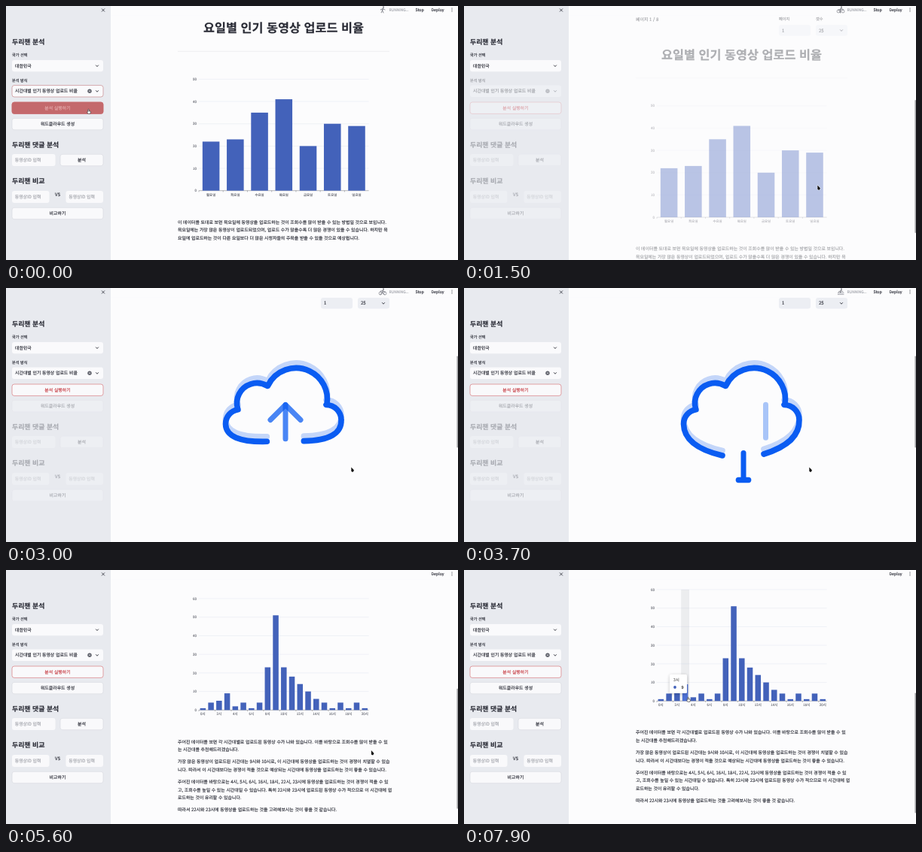
Write an HTML page with a canvas that moves like this. It is 600 px wide and 338 px high and loops after 8000 ms.

```html
<!DOCTYPE html>
<html lang="ko">
<head>
<meta charset="utf-8">
<style>
html, body { margin: 0; width: 100%; height: 100%; overflow: hidden; background: #fcfcfd; }
canvas { display: block; width: 600px; height: 338px; }
</style>
</head>
<body>
<canvas id="stage"></canvas>
<script>
const LOOP = 8000, W = 600, H = 338;
const LOADING = 1700, LOADED = 4400;
const INK = '#292b35', SOFT = '#6e7079', PALE = '#a3a5ac', RULE = '#dcdde3';
const BG = '#fcfcfd', BLUE = '#0a5cf2', BAR = '#4362ba', RED = '#c8434a';
const FONT = '"Noto Sans CJK KR", "Noto Sans CJK", "Noto Sans KR", sans-serif';
const BODY = 5.92, SMALL = 5.2, AXIS = 4.45;
const LEFT = 228, RIGHT = 509, MID = (LEFT + RIGHT) / 2;

const canvas = document.getElementById('stage');
const dpr = window.devicePixelRatio || 1;
canvas.width = W * dpr;
canvas.height = H * dpr;
const c = canvas.getContext('2d');

const ramp = (t, a, b) => Math.max(0, Math.min(1, (t - a) / (b - a)));
const mix = (a, b, k) => a + (b - a) * k;
const glide = (t, a, b) => {
  const k = ramp(t, a, b);
  return k * k * (3 - 2 * k);
};

function faded(alpha, draw) {
  c.save();
  c.globalAlpha *= alpha;
  draw();
  c.restore();
}

// y is the visual middle of the line; a hairline stroke gives the soft, dark look
function text(s, x, y, { size = BODY, color = INK, weight = 400, align = 'left' } = {}) {
  c.save();
  c.translate(x, y + size * 0.37);
  c.scale(0.25, 0.25);
  c.textRendering = 'geometricPrecision';
  c.font = `${weight} ${size * 4}px ${FONT}`;
  c.fillStyle = c.strokeStyle = color;
  c.lineWidth = 0.6;
  c.lineJoin = 'round';
  c.textAlign = align;
  c.fillText(s, 0, 0);
  c.strokeText(s, 0, 0);
  c.restore();
}

function box(x, y, w, h, fill, stroke, r = 3) {
  c.beginPath();
  c.roundRect(x, y, w, h, r);
  if (fill) { c.fillStyle = fill; c.fill(); }
  if (stroke) { c.strokeStyle = stroke; c.lineWidth = 0.6; c.stroke(); }
}

function line(pts, color, width = 0.5) {
  c.beginPath();
  pts.forEach(([x, y]) => c.lineTo(x, y));
  c.strokeStyle = color;
  c.lineWidth = width;
  c.stroke();
}
const hline = (x0, x1, y, color, width) => line([[x0, y], [x1, y]], color, width);
const vline = (x, y0, y1, color, width) => line([[x, y0], [x, y1]], color, width);

function disc(x, y, r, color) {
  c.beginPath();
  c.arc(x, y, r, 0, 7);
  c.fillStyle = color;
  c.fill();
}

const chevron = (x, y) => line([[x - 1.8, y - 1], [x, y + 1], [x + 1.8, y - 1]], INK, 0.9);

function cross(x, y, r, color, w) {
  line([[x - r, y - r], [x + r, y + r]], color, w);
  line([[x + r, y - r], [x - r, y + r]], color, w);
}

// Sidebar: every control is placed by its middle line
const PAD = 8, FULL = 121, ROW = 15.4;

function button(label, x, y, w, color = INK, edge = '#d5d7dd', fill = '#f9f9fb') {
  box(x, y - ROW / 2, w, ROW, fill, edge);
  text(label, x + w / 2, y, { color, align: 'center' });
}

function field(x, y, w) {
  box(x, y - 8, w, 16, '#f9f9fb');
  text('동영상ID 입력', x + 3.7, y, { color: PALE });
}

function select(label, value, y, edge) {
  text(label, PAD, y - 14.6, { size: SMALL });
  box(PAD, y - ROW / 2, FULL, ROW, '#fafafc', edge);
  text(value, PAD + 4, y);
  chevron(121, y);
}

const heading = (s, y) => text(s, PAD, y, { size: 8.9, weight: 700 });

function sidebar(t) {
  c.fillStyle = '#e8eaef';
  c.fillRect(0, 0, 139, H);
  cross(129, 5.5, 2, INK, 0.8);
  heading('두리챈 분석', 47.3);
  select('국가 선택', '대한민국', 79.6);

  const stale = glide(t, 150, 900);
  const y = 113.3, run = y + 22.4;
  faded(1 - 0.65 * (stale - glide(t, 1500, 1750)), () => {
    select('분석 방식', '시간대별 인기 동영상 업로드 비율', y, t < 300 && '#c07a7c');
    disc(111, y, 2.7, '#5f616b');
    cross(111, y, 1, '#fff', 0.6);
    button('분석 실행하기', PAD, run, FULL, RED, '#d4686d');
    faded(1 - ramp(t, 120, 350), () =>
      button('분석 실행하기', PAD, run, FULL, '#e3a9aa', '#c4696c', '#c4696c'));
  });

  faded(1 - 0.7 * (stale - glide(t, 4300, 4480)), () => {
    button('워드클라우드 생성', PAD, run + 21.4, FULL);
    heading('두리챈 댓글 분석', 184.3);
    field(PAD, 205, 57.5);
    button('분석', 72, 205, 57);
    heading('두리챈 비교', 233);
    field(PAD, 254, 49.5);
    text('VS', 68.5, 251, { align: 'center' });
    field(79.5, 254, 49.5);
    button('비교하기', PAD, 276, FULL);
  });
}

const VIDEOS = [
  ['달콩 소리 / dalko sound', '라온아이(LAONI)의 옥상무대를 라이브로! | HEY-YAYA, LIFT UP, WW, KLOK KN'],
  ['한들맑은수', '[한들맑은수] 한들맑은수의 입맞춤의 만남) teaser'],
  ['헬태산 GYM TAE SAAN', '프로회사가 된 그노즈... (Feat. 율해팀장)'],
  ['NOVALANES', '[RIDING NOVALANES SPECIAL] 가타 쿵쿵 : 아니마니 아니마니고 (ETC. : Bumpy Bunk'],
  ['QLTB', '음방 1위까지 한 바두럽 아이돌 플래이션 설계 ㅈㅈ'],
  ['공놀이방', '‘끝내주는 남자’ 손흘민 ‘1골 2도움’ 맹활약! #BALLDAY'],
  ['선장아재 Skipper Uncle', '한국에서 만난 요원 친구들 (feat. 체코괴, 챈치, 마평가레이, 삐니보들)'],
  ['NOVALANES', '[RIDING NOVALANES SPECIAL] 가타 쿵쿵 : 내가 이걸 피느질 보고 싶어 (ETC. : I Want To S']
];

// T is the height of the chart title on the stage
function table(T) {
  const top = T - 200, bottom = T - 61;
  c.save();
  c.beginPath();
  c.rect(LEFT, top, RIGHT - LEFT, bottom - top);
  c.clip();
  VIDEOS.forEach(([name, title], i) => {
    const y = T - 172 + i * 14;
    text(i + 2, 245, y, { size: 4.85, color: SOFT, align: 'right' });
    text(name, 252, y, { size: 4.85 });
    text(title, 316, y, { size: 4.85 });
    hline(LEFT, RIGHT, y + 7, RULE);
  });
  [LEFT, 248.5, 313, RIGHT].forEach(x => vline(x, top, bottom, RULE));
  c.restore();
}

function pager(T) {
  const y = T - 32;
  [[418, 1], [467, 25]].forEach(([x, value]) => {
    box(x, y - 7.3, 42, 14.6, '#eceef3');
    text(value, x + 4, y);
  });
  chevron(501, y);
}

// One sharp peak at nine, a straight decline after it, a low ripple elsewhere
function uploads(hour) {
  if (hour === 9) return 51;
  if (hour === 8) return 23;
  if (hour > 9 && hour < 15) return Math.floor(23 - 4.25 * (hour - 10));
  return Math.round(1.4 + 2.4 * (hour % 2) + 5.6 * Math.exp(-((hour - 2.6) ** 2)));
}

const DAYS = {
  title: '요일별 인기 동영상 업로드 비율',
  values: [22, 23, 35, 41, 20, 30, 29],
  label: i => '월화수목금토일'[i] + '요일',
  every: 1, max: 50,
  paras: [[
    '이 데이터를 토대로 보면 목요일에 동영상을 업로드하는 것이 조회수를 많이 받을 수 있는 방법일 것으로 보입니다.',
    '목요일에는 가장 많은 동영상이 업로드되었으며, 업로드 수가 많을수록 더 많은 경쟁이 있을 수 있습니다. 하지만 목',
    '요일에 업로드하는 것이 다른 요일보다 더 많은 시청자들의 주목을 받을 수 있을 것으로 예상됩니다.'
  ]]
};
const HOURS = {
  title: '시간대별 인기 동영상 업로드 비율',
  values: Array.from({ length: 21 }, (_, i) => uploads(i)),
  label: i => i + '시',
  every: 2, max: 60,
  paras: [[
    '주어진 데이터를 보면 각 시간대별로 업로드된 동영상 수가 나와 있습니다. 이를 바탕으로 조회수를 많이 받을 수 있',
    '는 시간대를 추천해드리겠습니다.'
  ], [
    '가장 많은 동영상이 업로드된 시간대는 9시와 10시로, 이 시간대에 동영상을 업로드하는 것이 경쟁이 치열할 수 있습',
    '니다. 따라서 이 시간대보다는 경쟁이 적을 것으로 예상되는 시간대에 동영상을 업로드하는 것이 좋을 수 있습니다.'
  ], [
    '주어진 데이터를 바탕으로는 4시, 5시, 6시, 16시, 18시, 22시, 23시에 동영상을 업로드하는 것이 경쟁이 적을 수 있',
    '고, 조회수를 높일 수 있는 시간대일 수 있습니다. 특히 22시와 23시에 업로드된 동영상 수가 적으므로 이 시간대에 업',
    '로드하는 것이 유리할 수 있습니다.'
  ], [
    '따라서 22시와 23시에 동영상을 업로드하는 것을 고려해보시는 것이 좋을 것 같습니다.'
  ]]
};

const X0 = 256, X1 = 481.6, PLOT = 148.3, BASE = 216.7;

function report(data, T, grow, hover = -1) {
  const { values, max, every } = data, base = T + BASE;
  const step = (X1 - X0) / values.length;
  text(data.title, MID, T + 0.2, { size: 16.27, weight: 700, align: 'center' });
  hline(LEFT, RIGHT, T + 31.3, RULE);

  for (let v = 0; v <= max; v += 10) {
    const y = base - v / max * PLOT;
    text(v, X0 - 3, y, { size: AXIS, color: SOFT, align: 'right' });
    hline(X0, X1, y, v ? '#e0e4ee' : SOFT);
  }
  if (hover >= 0) {
    c.fillStyle = 'rgba(150,155,170,0.16)';
    c.fillRect(X0 + hover * step, base - PLOT, step, PLOT);
  }
  values.forEach((v, i) => {
    const x = X0 + i * step, h = v / max * PLOT * grow;
    c.fillStyle = i === hover ? '#4d70d4' : BAR;
    c.fillRect(x + step * 0.15, base - h, step * 0.7, h);
    if (i % every) return;
    text(data.label(i), x + step / 2, base + 5.3, { size: AXIS, color: SOFT, align: 'center' });
    vline(x, base, base + 1.8, SOFT);
  });

  let y = T + 258.7;
  data.paras.forEach(lines => {
    lines.forEach(s => { text(s, LEFT, y); y += 10.4; });
    y += 6;
  });
}

// open = 0: bottom nearly closed, open = 1: ends hang down
function cloud(open) {
  const m = (a, b) => mix(a, b, open);
  c.beginPath();
  c.moveTo(m(348, 343), m(195, 223));
  c.quadraticCurveTo(292, m(203, 211), 291.5, 181);
  c.arc(311, 181, 19.5, Math.PI, 1.45 * Math.PI);
  c.arc(333, 153, 26.5, 2.83, 5.26);
  c.arc(385, 148, 41.5, -2.7, 0.17);
  c.arc(425, 175.5, 20, -Math.PI / 2, 0);
  c.quadraticCurveTo(446, m(201, 206), m(394, 398), m(195, 221));
  c.stroke();
}

function loader(t) {
  const p = ((t - 2180) / 1200 + 1) % 1;
  const open = glide(p, 0.1, 0.267) - glide(p, 0.5, 0.8);
  c.save();
  c.lineCap = c.lineJoin = 'round';
  c.lineWidth = 7.6;
  c.strokeStyle = '#c4d6f9';
  c.save();
  c.translate(0, -6.5);
  cloud(open);
  c.restore();

  faded(1 - glide(p, 0.35, 0.55) + glide(p, 0.85, 1), () =>
    vline(400.5, 184 - 52 * glide(p, 0, 0.5), 216 - 56 * glide(p, 0.05, 0.65), '#a9c5f8', 7));

  c.strokeStyle = BLUE;
  c.lineWidth = 7.6;
  cloud(open);

  const x = 371, ground = 255.5;
  const top = ground - 100 * glide(p, 0.04, 0.6);
  const head = 20 * glide(p, 0.3, 0.5);
  if (p > 0.05) faded(1 - ramp(p, 0.65, 0.78), () => {
    vline(x, top, ground - 55 * glide(p, 0.3, 0.7), BLUE, 7);
    if (head > 0.5) line([[x - head, top + head], [x, top], [x + head, top + head]], BLUE, 7);
  });
  const tray = 20.5 * (1 - glide(p, 0.1, 0.37) + glide(p, 0.7, 0.9));
  if (tray > 0.3) hline(x - tray, x + tray, ground, BLUE, 7.4);
  c.restore();
}

// A small figure that runs, then rides, then swims
function athlete(t) {
  const swing = Math.sin(t / 90) * 1.5;
  c.save();
  c.translate(500, 5);
  c.lineCap = 'round';
  disc(1, -3.4, 1, SOFT);
  line([[-3, -swing / 2], [0.5, -1.6], [3, swing / 2]], SOFT, 0.8);
  line([[0.5, -1.6], [-0.4, 1]], SOFT, 1.1);
  if (t < 3100 || t > 4300) line([[-2 - swing, 4], [-0.4, 1], [1 + swing, 4]], SOFT, 0.8);
  if (t > 1100 && t < 3100) [-3, 3].forEach(x => box(x - 2, 0, 4, 4, null, SOFT, 2));
  if (t > 3100 && t < 4300) [1.6, 3.6].forEach(y => hline(-4, 4, y, SOFT, 0.6));
  c.restore();
}

function topBar(t) {
  c.fillStyle = BG;
  c.fillRect(139, 0, 461, 12.5);
  faded(1 - ramp(t, 4350, 4620), () => {
    athlete(t);
    text('RUNNING...', 508.5, 5, { size: 4.9, color: PALE });
    text('Stop', 543.5, 5, { size: SMALL });
  });
  text('Deploy', 564.5, 5, { size: SMALL });
  [3, 5, 7].forEach(y => disc(592, y, 0.6, INK));
}

// The thumb follows from the page height and the scroll position
function scrollBar(t, T) {
  const page = t < LOADING ? 645 : t < LOADED ? 936 : 714;
  faded(ramp(t, 250, 400), () =>
    box(598.4, (303 - T) / page * H, 1.6, H * H / page, '#a2a3a6', null, 0.8));
}

function tooltip(i, x, y) {
  c.save();
  c.shadowColor = 'rgba(0,0,0,0.22)';
  c.shadowBlur = 4 * dpr;
  c.shadowOffsetY = dpr;
  box(x, y, 23, 25, '#fff', null, 1.5);
  c.restore();
  text(HOURS.label(i), x + 5, y + 7.5, { size: SMALL, color: '#666' });
  disc(x + 7, y + 17, 1.9, BAR);
  text(HOURS.values[i], x + 18.5, y + 17, { size: SMALL, color: '#555', weight: 700, align: 'right' });
}

function pointer(x, y, hand) {
  c.save();
  c.translate(x, y);
  c.lineJoin = 'round';
  if (hand) {
    box(-1.2, -2.6, 1.5, 4, '#fff', '#222', 0.7);
    box(-2, -0.2, 4.4, 3.6, '#fff', '#222', 1.4);
  } else {
    const shape = [[-0.7, -2.6], [-0.7, 3], [1.5, 4], [3, 1.4], [-0.7, -2.6]];
    line(shape, '#fff', 1);
    c.fillStyle = '#111';
    c.fill();
  }
  c.restore();
}

function draw(t) {
  c.setTransform(dpr, 0, 0, dpr, 0, 0);
  c.fillStyle = BG;
  c.fillRect(0, 0, W, H);

  const T = 29 + 165 * glide(t, 300, 760) - 141.7 * glide(t, 1050, 1600)
    - 101.7 * glide(t, 4950, 5850) + 7 * glide(t, 6650, 7000);

  const leave = glide(t, 100, 650), drift = glide(t, 1500, 2900);
  const aside = glide(t, 5000, 6200), enter = glide(t, 6850, 7250), sweep = glide(t, 7250, 7820);
  const mx = 110 + 360 * leave - 11 * drift + 53 * aside - 34 * enter - 180 * sweep;
  const my = 140 + 101 * leave + 3 * aside - 22 * enter - 50 * sweep;

  const inPlot = enter > 0 && mx < X1 && my < T + BASE;
  const hover = inPlot ? Math.floor((mx - X0) / (X1 - X0) * HOURS.values.length) : -1;

  if (t < LOADING) {
    faded(1 - 0.64 * glide(t, 150, 900), () => {
      table(T);
      text('페이지 1 / 8', LEFT, T - 47);
      text('페이지', 418, T - 47, { size: SMALL });
      text('갯수', 467, T - 47, { size: SMALL });
      pager(T);
      report(DAYS, T, 1);
    });
  } else {
    pager(T);
    if (t < LOADED) loader(t);
    else report(HOURS, T, 1 - (1 - ramp(t, 4560, 5500)) ** 3, hover);
  }

  topBar(t);
  scrollBar(t, T);
  sidebar(t);
  if (hover >= 0) tooltip(hover, mx - 25, my - 33);
  pointer(mx, my, t < 180 || (hover >= 0 && sweep > 0.95));
}

const start = performance.now();
function tick() {
  draw((performance.now() - start) % LOOP);
  requestAnimationFrame(tick);
}
tick();
</script>
</body>
</html>
```
